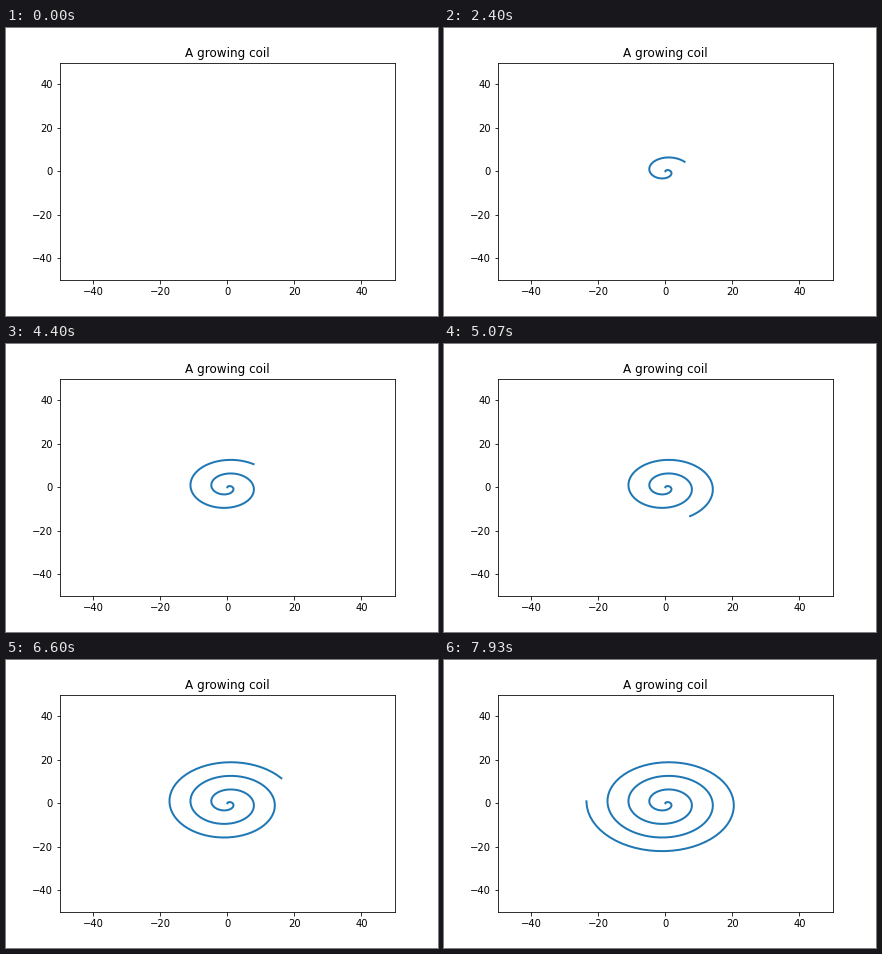
A matplotlib script that plays this animation: 432x288 px, repeating every 8 s.

```python
import numpy as np
import matplotlib.pyplot as plt
from matplotlib.animation import FuncAnimation

FRAMES = 120
LOOP_MS = 8000
STEP = 0.1            # parameter spacing between curve points
POINTS_PER_FRAME = 2

fig, ax = plt.subplots(figsize=(6, 4), dpi=72)
fig.subplots_adjust(left=0.125, right=0.9, bottom=0.125, top=0.88)
ax.set(xlim=(-50, 50), ylim=(-50, 50))
ax.set_xticks(range(-40, 41, 20))
ax.set_yticks(range(-40, 41, 20))
ax.set_title("A growing coil")
line, = ax.plot([], [], lw=2, color="#1f77b4")


def init():
    line.set_data([], [])
    return line,


def update(frame):
    t = STEP * np.arange(POINTS_PER_FRAME * frame + 1)
    line.set_data(t * np.sin(t), t * np.cos(t))
    return line,


anim = FuncAnimation(fig, update, frames=FRAMES, init_func=init,
                     interval=LOOP_MS / FRAMES, repeat=True, repeat_delay=0)
plt.show()
```
